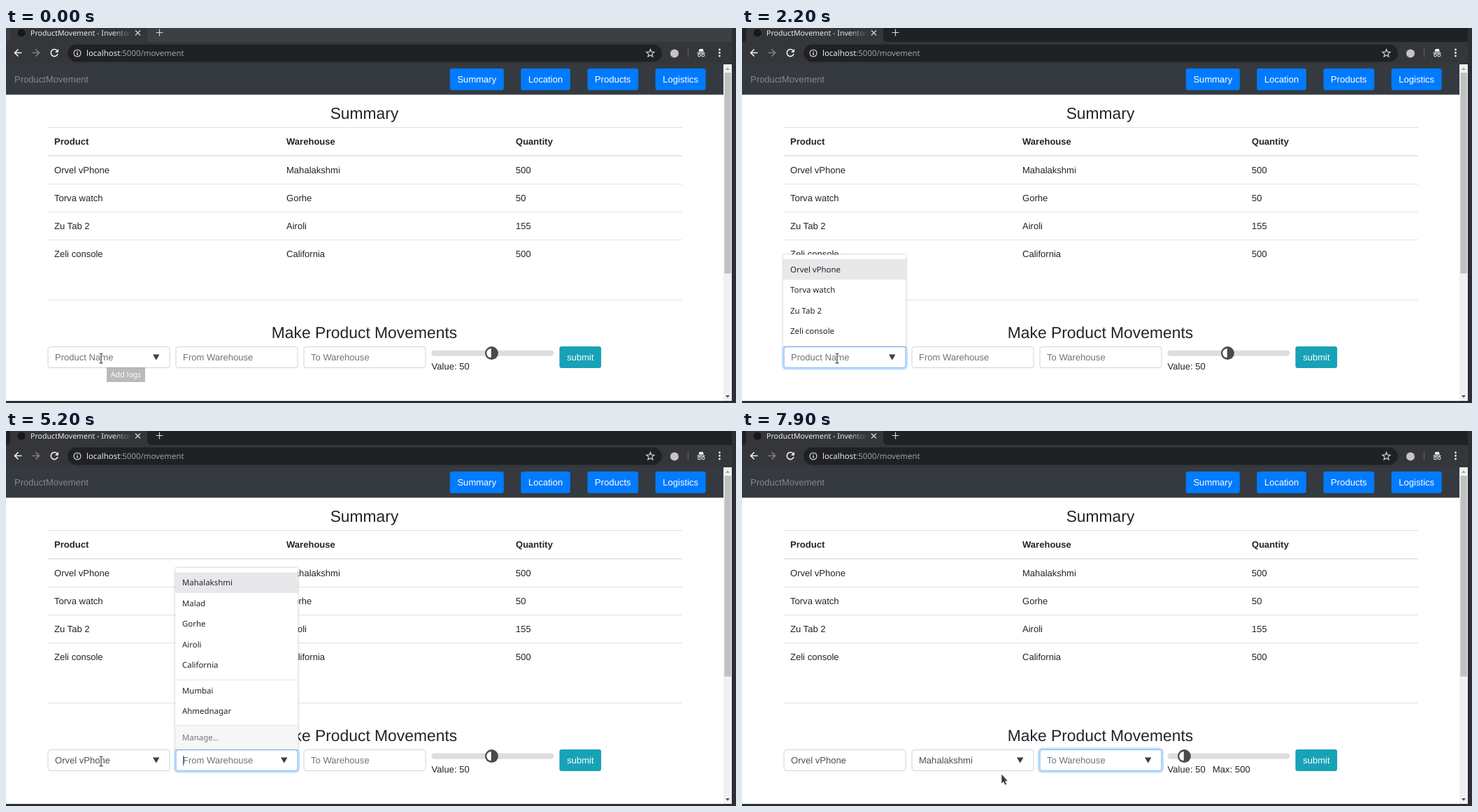
Animation, 1044 px wide and 537 px high, one loop 8000 ms. Source, as an HTML page:

```html
<!DOCTYPE html>
<html lang="en">
<head>
<meta charset="utf-8">
<title>ProductMovement</title>
<style>
  html, body { margin: 0; width: 100%; height: 100%; overflow: hidden; background: #fff; }
  svg { display: block; }
  text { font: 13.06px "Liberation Sans", Arial, sans-serif; fill: #212529; text-rendering: geometricPrecision; white-space: pre; }
  .bold { font-weight: 700; }
  .head { font-size: 22.85px; }
  .mid { text-anchor: middle; }
  .white { fill: #fff; }
  .ui { font: 11.43px "Noto Sans", "Open Sans", sans-serif; }
  .small { font-size: 10.6px; }
  .icon { fill: none; stroke: #f1f3f4; stroke-width: 1.6; }
  .thin { stroke: #d5d7da; stroke-width: 1.2; }
  .popup { filter: drop-shadow(0 0.5px 1.5px rgba(0, 0, 0, .3)); }
</style>
</head>
<body>
<svg id="stage" width="1044" height="537" viewBox="0 0 1044 537"></svg>
<script>
const LOOP = 8000;
const products = ['Orvel vPhone', 'Torva watch', 'Zu Tab 2', 'Zeli console'];
const places = ['Mahalakshmi', 'Malad', 'Gorhe', 'Airoli', 'California'];
const placeholders = ['Product Name', 'From Warehouse', 'To Warehouse'];
const caretToggles = [400, 1000, 1600, 2200, 3000, 3500, 4000, 4600, 5200, 5800, 6100, 6700, 7300, 7900];

const text = (x, y, str, cls = '', more = '') => `<text x="${x}" y="${y}" class="${cls}" ${more}>${str}</text>`;
const rect = (x, y, w, h, fill, more = '') => `<rect x="${x}" y="${y}" width="${w}" height="${h}" fill="${fill}" ${more}/>`;
const path = (d, more = '') => `<path d="${d}" ${more}/>`;
const circle = (x, y, r, more = '') => `<circle cx="${x}" cy="${y}" r="${r}" ${more}/>`;
const icon = (d, cls = '') => path(d, `class="icon ${cls}"`);
const button = (x, y, w, label, fill) =>
  rect(x, y, w, 31, fill, 'rx="3.3"') + text(x + w / 2, y + 19.6, label, 'mid white');

function browser() {
  return `<linearGradient id="fade" gradientUnits="userSpaceOnUse" x1="154" x2="180">
      <stop stop-color="#e8eaed"/><stop offset="1" stop-color="#e8eaed" stop-opacity="0"/></linearGradient>` +
    rect(0, 0, 1044, 537, '#2c2f36') +
    rect(0, 0, 1038, 21, '#202124', 'id="strip"') + rect(0, 20, 1038, 32, '#35363a') +
    path('M0 20q6 0 6-6V0H202V14q0 6 6 6z', 'fill="#35363a"') +
    circle(22, 7, 5.5, 'fill="#17181a"') +
    text(35, 10.8, 'ProductMovement - Inventory', 'ui small', 'style="fill:url(#fade)"') +
    icon('M185 3.5l7 7m0-7l-7 7M214.500 6.500h10m-5-5v10', 'thin') +
    icon('M22.500 35.500H12.500m5-5l-5 5l5 5') +
    `<g opacity=".4">${icon('M37.500 35.500h10m-5-5l5 5l-5 5')}</g>` +
    icon('M73 32.300A5 5 0 1 0 74 37') + path('M75 30v5h-5z', 'fill="#f1f3f4"') +
    rect(88, 23.500, 850, 25, '#202124', 'rx="12.5"') +
    circle(102, 36, 5, 'class="icon thin"') +
    path('M102 35v4M102 32.800v1.300', 'stroke="#f1f3f4" stroke-width="1.3"') +
    text(115, 39.800, '<tspan fill="#e8eaed">localhost</tspan><tspan fill="#9aa0a6">:5000/movement</tspan>', 'ui') +
    icon('M921.500 30.500l1.500 3.700 4 .3-3 2.600.9 3.900-3.400-2.100-3.400 2.100.9-3.900-3-2.600 4-.3z', 'thin') +
    circle(956, 36.500, 6, 'fill="#c3c5c8"') +
    rect(975, 29, 1, 13, '#5f6368') +
    path('M988.500 35h11v1.300h-11zM990.500 34l1.200-4h5l1.200 4z', 'fill="#f1f3f4"') +
    [991.5, 997].map(x => circle(x, 39, 1.9, 'class="icon thin"')).join('') +
    [31, 35.5, 40].map(y => circle(1020.5, y, 1.4, 'fill="#f1f3f4"')).join('');
}

function page() {
  const rows = products.map((name, i) => [name, [places[0], ...places.slice(2)][i], [500, 50, 155, 500][i]]);
  const row = (cells, y, cls) => [69, 401, 729].map((x, i) => text(x, y, cells[i], cls)).join('');
  return rect(0, 52, 1026, 482, '#fff') + rect(0, 51.5, 1026, 44, '#343a40') +
    text(12, 77.6, 'ProductMovement', '', 'style="fill:#85888c"') +
    button(634.8, 58, 77.1, 'Summary', '#007bff') + button(736.3, 58, 70.6, 'Location', '#007bff') +
    button(831.5, 58, 72.7, 'Products', '#007bff') + button(928.7, 58, 72, 'Logistics', '#007bff') +
    text(512.5, 130, 'Summary', 'head mid') +
    rect(60, 142, 907, 1, '#dee2e6') + rect(60, 182.3, 907, 1.6, '#dee2e6') +
    [223, 263, 303].map(y => rect(60, y, 907, 1, '#dee2e6')).join('') +
    row(['Product', 'Warehouse', 'Quantity'], 167, 'bold') +
    rows.map((cells, i) => row(cells, 207.7 + 40 * i)).join('') +
    rect(60, 389, 907, 1, '#e2e2e2') +
    text(512.5, 444, 'Make Product Movements', 'head mid') +
    rect(1026, 52, 12, 482, '#f1f1f1') + rect(1027.5, 64, 9.5, 287.5, '#c1c1c1') +
    path('M1029 60h6l-3-3.500z', 'fill="#a3a3a3"') + path('M1029 526h6l-3 3.500z', 'fill="#505050"');
}

function field(i) {
  const x = 60 + 183 * i;
  return rect(x, 456.5, 174, 30, '#fff', 'rx="3.3" stroke="#ced4da"') +
    `<g id="glow${i}">${rect(x - 1.8, 454.7, 177.6, 33.6, 'none', 'rx="5" stroke="#bfdeff" stroke-width="2.6"')}
     ${rect(x, 456.5, 174, 30, 'none', 'rx="3.3" stroke="#80bdff"')}</g>` +
    text(x + 10, 475.8, '', '', `id="value${i}"`) +
    path(`M${x + 150} 467.500h9.500l-4.750 8z`, `id="arrow${i}" fill="#3c4043"`) +
    rect(x + 10.3, 465, 1, 14, '#343a40', `id="caret${i}"`);
}

function slider() {
  return rect(608.5, 461.5, 175, 8.2, '#dedede', 'rx="4.1"') +
    `<g id="thumb">${circle(0, 0, 9.5, 'fill="#4b4b4d"')}${path('M-.700-6.500a6.500 6.500 0 0 0 0 13z', 'fill="#fff"')}</g>` +
    text(608.5, 489.3, 'Value: 50') + text(673, 489.3, 'Max: 500', '', 'id="max"') +
    button(791.5, 456, 59.7, 'submit', '#17a2b8');
}

function popup(id, x, y, items, extra = '') {
  return `<g id="${id}" class="popup">` + rect(x, y, 175.5, 455.8 - y, '#fff', 'rx="1.5"') +
    rect(x, y + 6.5, 175.5, 29.4, '#e8e8eb', `id="${id}Mark"`) +
    items.map((item, i) => text(x + 10, y + 25.3 + 29.4 * i, item, 'ui')).join('') + extra + '</g>';
}

const placesExtra = rect(242, 356, 175.5, 1, '#e6e6e6') +
  text(252, 375.6, 'Mumbai', 'ui') + text(252, 404.9, 'Ahmednagar', 'ui') +
  rect(242, 421.5, 175.5, 34.3, '#f6f6f6') + rect(242, 421, 175.5, 1, '#e6e6e6') +
  text(252, 442.8, 'Manage...', 'ui', 'style="fill:#757575"');

const beam = 'M-2.500-7q2.500 0 2.500 1.500V5.500q0 1.500-2.500 1.500M2.500-7q-2.500 0-2.500 1.500V5.500q0 1.500 2.500 1.500';

document.getElementById('stage').innerHTML = browser() + page() +
  [0, 1, 2].map(field).join('') + slider() +
  popup('goods', 59, 324.5, products) + popup('sites', 242, 196, places, placesExtra) +
  `<g id="tip">${rect(144, 486, 55, 21, '#777')}${text(171.5, 500.3, 'Add logs', 'ui small mid white')}</g>
   <g id="beam" fill="none">${path(beam, 'stroke="#fff" stroke-width="2.6"')}${path(beam, 'stroke="#333" stroke-width="1.1"')}</g>` +
  path('M371 491v14l3-2.500 2 4.500 2.500-1.200-2-4.200 3.800-.4z', 'id="pointer" fill="#3a3a3c" stroke="#fff" stroke-width=".6"');

const el = id => document.getElementById(id);
const fade = (id, opacity) => el(id).setAttribute('opacity', Number(opacity));
const move = (id, x, y) => el(id).setAttribute('transform', `translate(${x} ${y})`);
const within = (t, from, to) => t >= from && t < to;

function draw(time) {
  const t = Math.floor(time % LOOP / 100) * 100;
  const focus = t < 400 ? -1 : t < 3000 ? 0 : t < 6100 ? 1 : 2;
  const hover = t < 7800 ? 0 : 1;
  const caretOn = caretToggles.filter(at => at <= t).length % 2 === 1;
  const handover = Math.min(1, Math.max(0, (t - 6100) / 200));
  const glows = [
    t === 400 ? .3 : within(t, 500, 3000),
    t < 3000 ? 0 : 1 - handover,
    handover
  ];
  const values = [t >= 3000 && products[0], t >= 6100 && places[0], ''];

  for (let i = 0; i < 3; i++) {
    fade('glow' + i, glows[i]);
    fade('arrow' + i, i === focus || i === hover);
    fade('caret' + i, i === focus && caretOn);
    el('value' + i).textContent = values[i] || placeholders[i];
    el('value' + i).style.fill = values[i] ? '#495057' : '#6c757d';
  }
  // The window is inactive until it is clicked.
  el('strip').setAttribute('fill', t < 300 ? '#3c4043' : '#202124');
  fade('goods', within(t, 400, 3000));
  fade('goodsMark', t >= 1500);
  fade('sites', t < 5200 ? 0 : t < 6100 ? 1 : t < 6200 ? .9 : t < 6300 ? .35 : 0);
  fade('tip', Math.max(0, .5 - t / 600));
  fade('max', t >= 6100);
  move('thumb', t < 6100 ? 694.5 : 632.5, 465.6);

  const slide = Math.max(0, (t - 7600) / 300);
  move('beam', 136 + 235 * slide, 473 + 9 * slide);
  fade('beam', t < 7900);
  fade('pointer', t >= 7900);
}

const start = performance.now();
(function frame() {
  draw(performance.now() - start);
  requestAnimationFrame(frame);
})();
</script>
</body>
</html>
```
